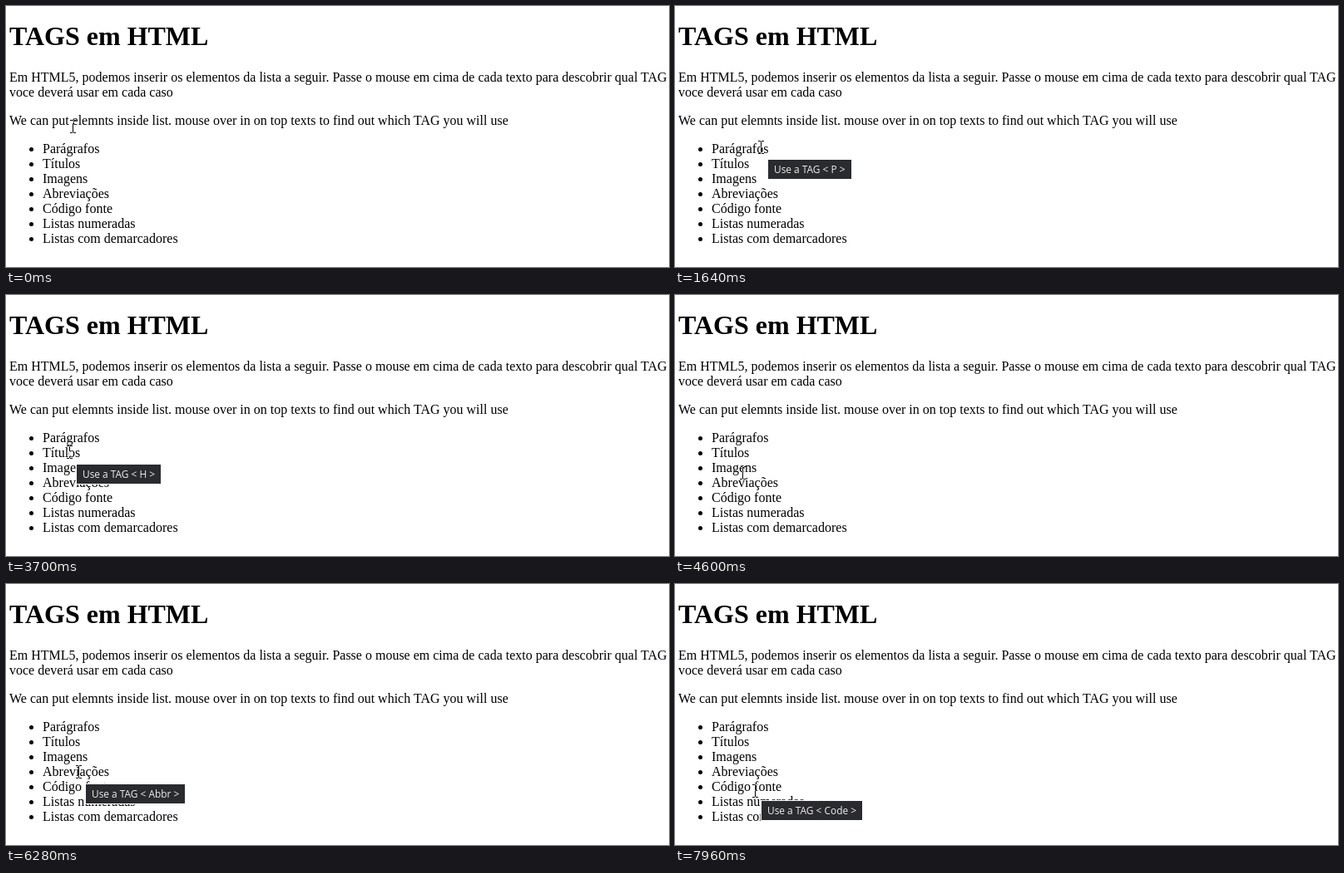
These frames come from a looping animation (797 by 314 pixels, 7.99 s). An HTML page:

```html
<!DOCTYPE html>
<html lang="pt">
<head>
<meta charset="utf-8">
<title>TAGS em HTML</title>
<style>
  html, body { margin: 0; width: 100%; height: 100%; overflow: hidden; background: #fff; }
  main {
    position: relative; z-index: 0; display: flow-root; box-sizing: border-box;
    width: 797px; height: 314px; padding-left: 4px; overflow: hidden;
    background: #fff; color: #000; white-space: nowrap;
    font: 16px/18px "Liberation Serif", serif;
  }
  h1 { margin: 18px 0 23px; font-size: 32px; line-height: 36px; }
  p, ul { margin: 16px 0; }
  ul { padding-left: 40px; }
  #tip, #cursor { position: absolute; left: 0; top: 0; }
  #tip {
    padding: 0 7px; border: 1px solid #fff; background: #2a2b2e; color: #eee;
    font: 11.9px/23px "Open Sans", sans-serif;
  }
  #cursor { mix-blend-mode: difference; fill: none; stroke: #fff; shape-rendering: crispEdges; }
</style>
</head>
<body>
<main>
  <h1>TAGS em HTML</h1>
  <p>Em HTML5, podemos inserir os elementos da lista a seguir. Passe o mouse em cima de cada texto para descobrir qual TAG<br>voce deverá usar em cada caso</p>
  <p>We can put elemnts inside list. mouse over in on top texts to find out which TAG you will use</p>
  <ul>
    <li>Parágrafos</li>
    <li>Títulos</li>
    <li>Imagens</li>
    <li>Abreviações</li>
    <li>Código fonte</li>
    <li>Listas numeradas</li>
    <li>Listas com demarcadores</li>
  </ul>
  <div id="tip"></div>
  <svg id="cursor" width="7" height="16"><path d="M0 .5H3M4 .5H7M3.5 1V15M0 15.5H3M4 15.5H7"/></svg>
</main>
<script>
const LOOP = 7990, HOVER_DELAY = 530;
const LIST_TOP = 163, ROW_HEIGHT = 18;
const tags = ["P", "H", "Img", "Abbr", "Code"];

// The pointer's moves: when each one starts and ends, and where it stops
const move = (leave, arrive, x, y) => ({ leave, arrive, x, y });
const moves = [
  move(80, 620, 107, 165),
  move(620, 1110, 103, 162),
  move(2210, 2960, 77, 180),
  move(3060, 3170, 76, 181),
  move(3940, 4580, 81, 206),
  move(5370, 5410, 83, 208),
  move(5600, 5750, 87, 218),
  move(6730, 6990, 95, 238),
  move(7930, 7960, 96, 241)
];

const tip = document.getElementById("tip");
const cursor = document.getElementById("cursor");
const place = (node, x, y) => node.style.transform = `translate(${x}px, ${y}px)`;
const clamp = k => Math.min(1, Math.max(0, k));
const rowAt = y => Math.floor((y + 8 - LIST_TOP) / ROW_HEIGHT);

function pointerAt(t) {
  let x = 80, y = 137;
  for (const m of moves) {
    const k = clamp((t - m.leave) / (m.arrive - m.leave));
    x += (m.x - x) * k;
    y += (m.y - y) * k;
  }
  return { x: Math.round(x), y: Math.round(y) };
}

function draw(t) {
  const pointer = pointerAt(t), row = rowAt(pointer.y);
  place(cursor, pointer.x - 3, pointer.y);
  // A tip opens after a rest and stays until the pointer leaves its row
  const rest = moves.findLast(m => t >= m.arrive + HOVER_DELAY && rowAt(m.y) === row);
  tip.hidden = !rest;
  if (rest) {
    tip.textContent = `Use a TAG < ${tags[row]} >`;
    place(tip, rest.x + 8, rest.y + 22);
  }
}

const start = performance.now();
function tick() {
  draw((performance.now() - start) % LOOP);
  requestAnimationFrame(tick);
}
tick();
</script>
</body>
</html>
```
